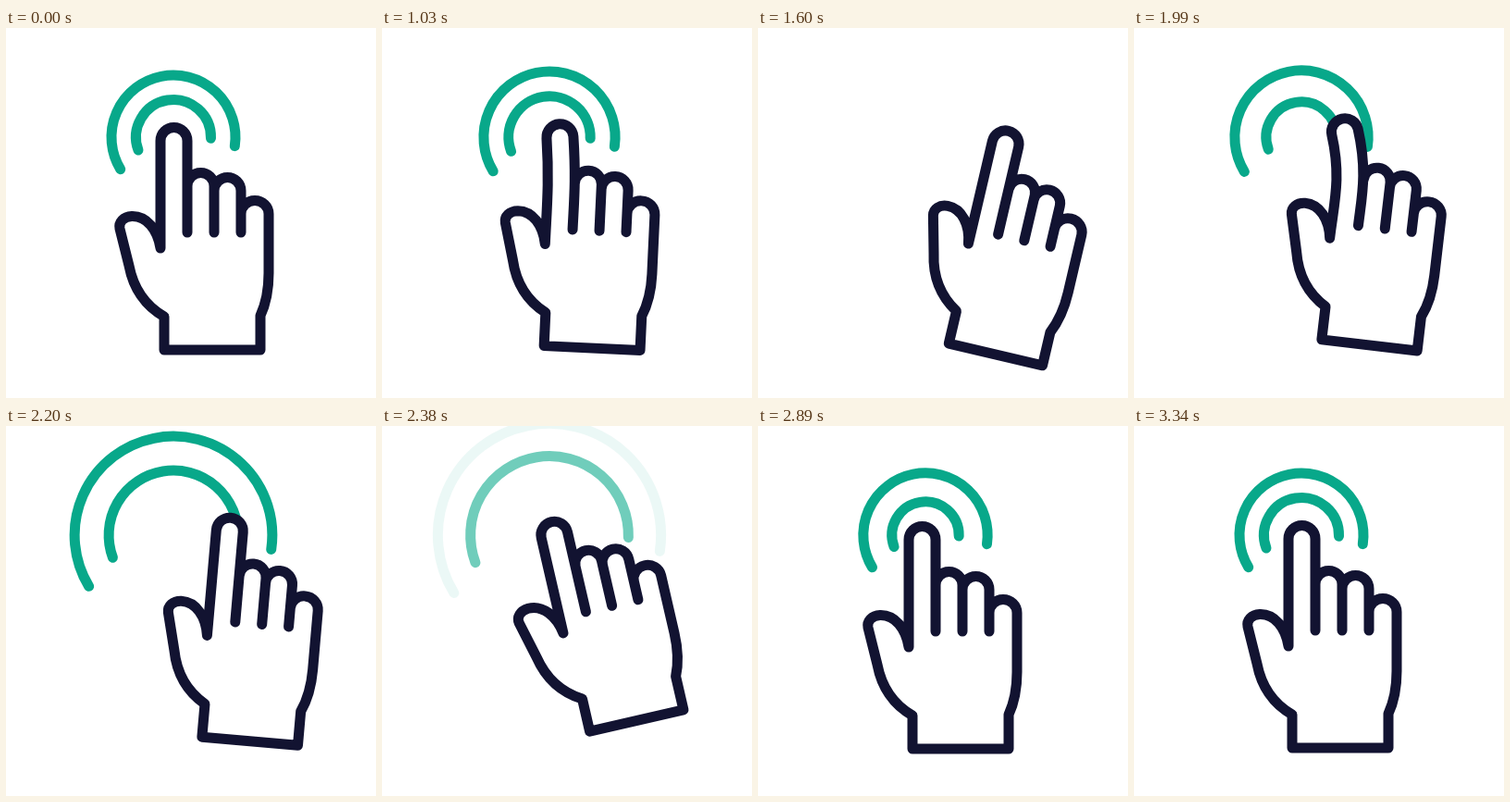
Recreate the animation shown at these times as an HTML page. Size 400 px wide and 400 px high, loop 3.37 s.

```html
<!DOCTYPE html>
<html lang="en">
<head>
<meta charset="utf-8">
<title>Tap gesture</title>
<style>
  html, body { margin: 0; width: 100%; height: 100%; overflow: hidden; background: #fff; }
  svg { display: block; width: 100%; height: 100%; }
  path { stroke-width: 11; stroke-linecap: round; stroke-linejoin: round; }
  .ring { fill: none; stroke: #08a88a; }
  #hand { fill: #fff; stroke: #121331; }
</style>
</head>
<body>
<svg viewBox="0 0 400 400">
  <path class="ring" id="outer"/>
  <path class="ring" id="inner"/>
  <path id="hand"/>
</svg>
<script>
const LOOP = 3370, STEP = 30;
const LEAVE = 1000, TAP_1 = 1740, TAP_2 = 2380, END = 3340;
const R = 14.5; // fingertip radius

// Fingertip position, hand rotation, fingertip squash
const REST = { x: 181.5, y: 122, turn: 0, squash: 0 };
const FAR = { x: 288, y: 136, turn: 19.4, squash: 0 };
const NEAR = { x: 252, y: 117.3, turn: 8.1, squash: 0 };
const PRESS = { x: 184, y: 107.6, turn: -13, squash: 10.5 };
const SETTLE = { x: 177.5, y: 123, turn: 0, squash: 0 };

const clamp = u => Math.min(1, Math.max(0, u));
const mix = (a, b, u) => a + (b - a) * u;
const rad = deg => deg * Math.PI / 180;
const $ = id => document.getElementById(id);

const easeOut = power => u => 1 - (1 - u) ** power;
const easeInOut = u => u < 0.5 ? 4 * u ** 3 : 1 - 4 * (1 - u) ** 3;
const backOut = (u, over) => 1 + (over + 1) * (u - 1) ** 3 + over * (u - 1) ** 2;

// The finger trails behind while the hand pulls away
const pull = easeOut(2.5);
const trail = u => -20 * Math.sin(Math.PI * u ** 0.8);

const MOVES = [
  { until: LEAVE, to: REST },
  { until: 1520, to: FAR, ease: pull },
  { until: TAP_1, to: PRESS, ease: easeInOut },
  { until: 1870, to: REST, ease: easeInOut },
  { until: 2110, to: NEAR, ease: pull },
  { until: TAP_2, to: PRESS, ease: easeInOut },
  { until: 2890, to: SETTLE, ease: easeInOut },
  { until: END, to: REST, ease: easeInOut }
];

function handPose(t) {
  if (t <= LEAVE) return { ...REST, bend: 0 };
  const i = MOVES.findIndex(m => t <= m.until);
  const from = MOVES[i - 1], move = MOVES[i];
  const u = (t - from.until) / (move.until - from.until), e = move.ease(u);
  const pose = {};
  for (const k in REST) pose[k] = mix(from.to[k], move.to[k], e);
  pose.y -= 0.44 * Math.abs(move.to.x - from.to.x) * e * (1 - e);
  pose.bend = move.ease === pull ? trail(u) : 0;
  return pose;
}

function handPath(bend, squash) {
  const x = REST.x + bend * 0.6, y = REST.y + squash;
  const c = Math.cos(rad(bend)), s = Math.sin(rad(bend));
  const side = (k, down) => `${x + k * R * c - down * s} ${y + k * R * s + down * c}`;
  const arc = `A${R} ${R} 0 0 `;
  return `M167 238C167 200 ${side(-1, 48)} ${side(-1, 0)}`
    + `${arc}1 ${side(1, 0)}C${side(1, 48)} 196 190 196 221`
    + `M196 171${arc}1 225 171V221`
    + `M225 221V176${arc}1 254 176V221`
    + `M167 238C164 218 152 203 136 203.5C127 204 121.5 210 123 217`
    + `L133 257C138 283 152 301 171 312V348H275V311`
    + `C281 298 284 282 284 265V201A15 ${R} 0 0 0 254 201V221`;
}

const OUTER = { rest: 67, max: 122, delay: 0, settle: 500, over: 1.7, from: 148.8, to: 8.3 };
const INNER = { rest: 40.5, max: 90, delay: 88, settle: 850, over: 0.37, from: 159.7, to: 1.6 };

// Rings spread away, burst on the first tap and settle after the second
function ringState(ring, t) {
  const fade = u => clamp((0.912 - u) / 0.24);
  if (t < 1540) {
    const u = clamp((t - LEAVE) / 480);
    return { r: mix(ring.rest, ring.max, easeOut(1.2)(u)), opacity: fade(u) };
  }
  const age = t - ring.delay - (TAP_2 + 30);
  if (age >= 0) {
    return { r: ring.rest * backOut(clamp(age / ring.settle), ring.over), opacity: 1 };
  }
  const u = (t - ring.delay - (TAP_1 - 14)) / 732;
  return { r: ring.max * easeOut(2)(clamp(u)), opacity: u > 0 ? fade(u) : 0 };
}

function drawRing(el, ring, t) {
  const { r, opacity } = ringState(ring, t);
  const at = deg => `${181 + r * Math.cos(rad(deg))} ${118 + r * Math.sin(rad(deg))}`;
  el.setAttribute('d', `M${at(ring.from)}A${r} ${r} 0 1 1 ${at(ring.to)}`);
  el.setAttribute('opacity', opacity);
}

function draw(ms) {
  const t = Math.floor((ms % LOOP - LEAVE) / STEP) * STEP + LEAVE;
  drawRing($('outer'), OUTER, t);
  drawRing($('inner'), INNER, t);
  const { x, y, turn, bend, squash } = handPose(t);
  $('hand').setAttribute('d', handPath(bend, squash));
  $('hand').setAttribute('transform',
    `translate(${x} ${y}) rotate(${turn}) translate(${-REST.x} ${-REST.y})`);
}

const begin = performance.now();
function tick() {
  draw(performance.now() - begin);
  requestAnimationFrame(tick);
}
tick();
</script>
</body>
</html>
```
